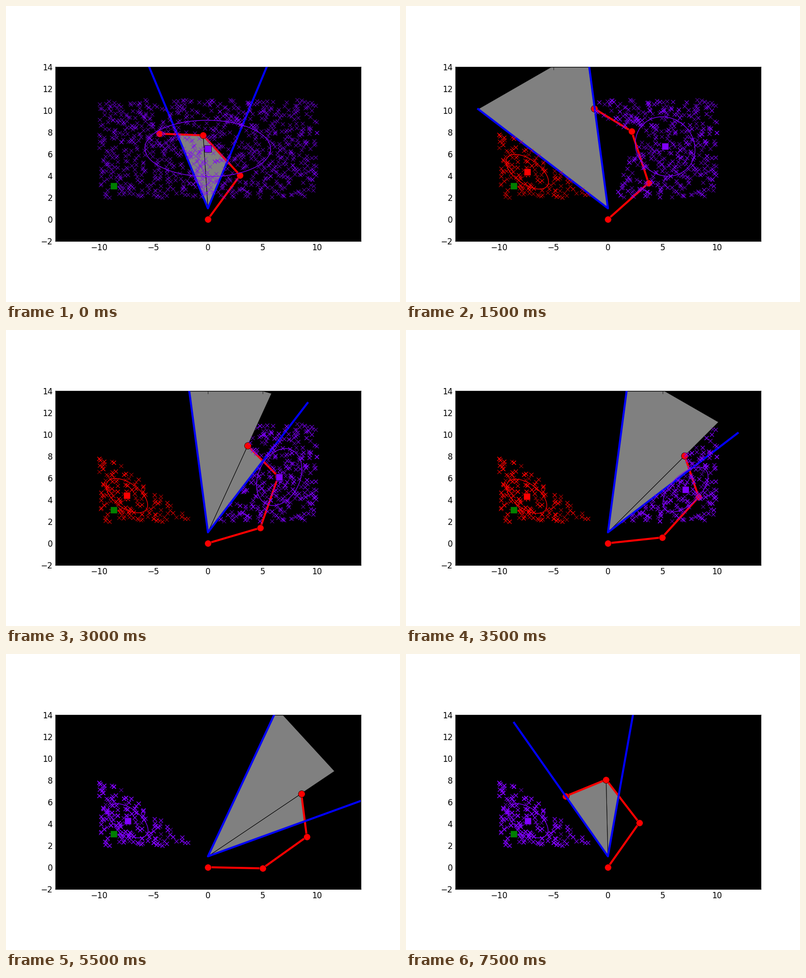
These frames come from a looping animation (812x612 px, 8 s). A matplotlib script:

```python
import numpy as np
import matplotlib.pyplot as plt
from matplotlib.animation import FuncAnimation
from matplotlib.collections import PolyCollection
from matplotlib.path import Path

plt.rcParams.update({"font.family": "DejaVu Sans", "font.size": 12,
                     "axes.linewidth": 1.0})

EYE = np.array([0.0, 1.0])
REACH, HALF_FOV = 15.0, 22.5
LINKS = (5, 5, 4)
COLORS = ((0.5, 0, 1), (1, 0, 0))
COUNT = 1000

GAZE = (90, 90, 105, 120, 105, 90, 75, 60, 45, 30,
        27.5, 42.5, 57.5, 72.5, 87.5, 102.5)
# Absolute heading of each arm link, in degrees
ARM = ((53.9, 132.6, 177.9), (43, 105, 170), (42, 106, 160),
       (41.8, 108.1, 148.7), (34.2, 100.7, 154.4), (26.6, 93.4, 160.2),
       (16.4, 70.7, 134.4), (6.1, 48, 108.6), (-4.5, 34.3, 94.3),
       (-10, 20.6, 79.9), (-12.2, 17, 76), (-1.2, 35.6, 97.2),
       (10, 54, 117), (24, 78, 145), (40, 104, 175), (54.9, 127.5, 202.3))


def unit(deg):
    a = np.radians(deg)
    return np.array([np.cos(a), np.sin(a)])


def bearing(p):
    d = np.asarray(p) - EYE
    return np.degrees(np.arctan2(d[..., 1], d[..., 0]))


def arm_joints(headings):
    steps = [n * unit(h) for n, h in zip(LINKS, headings)]
    return np.vstack([[0, 0], np.cumsum(steps, axis=0)])


def cast(deg, seg):
    """Distance along the ray and position along the segment."""
    p, q = seg
    m = np.column_stack([unit(deg), p - q])
    if abs(np.linalg.det(m)) < 1e-9:
        return np.inf, np.inf
    return np.linalg.solve(m, p - EYE)


def visible(gaze, joints):
    """Triangles the eye can see, with the arm blocking the view."""
    lo, hi = gaze - HALF_FOV, gaze + HALF_FOV
    chord = (EYE + REACH * unit(lo), EYE + REACH * unit(hi))
    links = list(zip(joints[:-1], joints[1:]))
    cuts = [lo] + sorted(b for b in bearing(joints) if lo < b < hi) + [hi]
    tris = []
    for a, b in zip(cuts[:-1], cuts[1:]):
        mid = (a + b) / 2
        best, wall = cast(mid, chord)[0], chord
        for link in links:
            t, s = cast(mid, link)
            if 0 < t < best and 0 <= s <= 1:
                best, wall = t, link
        tris.append([EYE] + [EYE + cast(g, wall)[0] * unit(g) for g in (a, b)])
    return np.array(tris)


def scatter_particles(rng):
    def spread(lo, hi):
        return lo + (hi - lo) * (rng.permutation(COUNT) + rng.random(COUNT)) / COUNT
    x, y = spread(-10, 10), spread(2, 11)
    low = (x > 0) & (bearing(np.column_stack([x, y])) < 8.5)
    corner = (x > 9.8) & (y < 3.4)
    pts = np.column_stack([x, y])[~(low | corner)]
    return np.vstack([pts, [8.85, 2.15]])


def resample(pts, tris, rng):
    """Drop seen particles and refill with copies of the rest."""
    seen = np.zeros(len(pts), bool)
    for tri in tris:
        seen |= Path(tri).contains_points(pts)
    rest = pts[~seen]
    return np.vstack([rest, rest[rng.integers(len(rest), size=seen.sum())]])


def clusters(k, pts):
    if k == 0:
        return [pts]
    left = bearing(pts) > 107
    groups = [pts[~left], pts[left]]
    if k >= 8:
        groups.reverse()
    return [g for g in groups if len(g)]


def spread_ellipse(pts):
    mean = pts.mean(axis=0)
    d = pts - mean
    w, v = np.linalg.eigh(d.T @ d / len(pts))
    t = np.linspace(0, 2 * np.pi, 121)
    ring = np.array([np.cos(t), np.sin(t)])
    return mean, mean[:, None] + v @ (np.sqrt(np.clip(w, 0, None))[:, None] * ring)


def simulate():
    rng = np.random.default_rng(7)
    pts = scatter_particles(rng)
    out = []
    for k, (gaze, headings) in enumerate(zip(GAZE, ARM)):
        joints = arm_joints(headings)
        tris = visible(gaze, joints)
        if k:
            pts = resample(pts, tris, rng)
        out.append((gaze, joints, tris, clusters(k, pts)))
    return out


STATES = simulate()

# The small excess keeps the pixel size from rounding down
fig = plt.figure(figsize=(8.12001, 6.12001), dpi=100, facecolor="white")
ax = fig.add_axes([0.125, 0.1, 0.775, 0.8], facecolor="black")
ax.set(xlim=(-14, 14), ylim=(-2, 14), aspect="equal",
       xticks=range(-10, 11, 5), yticks=range(-2, 15, 2))
ax.set_axisbelow(False)
ax.tick_params(direction="in", top=True, right=True, length=4, width=0.5, pad=4)

sight = PolyCollection([], facecolor="gray", edgecolor="black",
                       linewidth=0.7, zorder=1)
ax.add_collection(sight, autolim=False)
edge = dict(markeredgecolor="black", markeredgewidth=0.5)
arm, = ax.plot([], [], "o-", color="red", lw=3, ms=10, zorder=2, **edge)
view, = ax.plot([], [], color="blue", lw=3, zorder=3)
layers = []
for c in COLORS:
    cross, = ax.plot([], [], "x", color=c, ms=6, mew=0.5, zorder=4)
    ring, = ax.plot([], [], color=c, lw=1, zorder=4)
    center, = ax.plot([], [], "s", color=c, ms=10, zorder=5, **edge)
    layers.append((cross, ring, center))
ax.plot([-8.65], [3.05], "s", color="green", ms=9.5, zorder=6, **edge)


def draw(k):
    gaze, joints, tris, groups = STATES[k]
    sight.set_verts(tris)
    arm.set_data(*joints.T)
    ends = [EYE + REACH * unit(gaze + s * HALF_FOV) for s in (1, -1)]
    view.set_data(*np.array([ends[0], EYE, ends[1]]).T)
    for i, (cross, ring, center) in enumerate(layers):
        shown = i < len(groups)
        for artist in (cross, ring, center):
            artist.set_visible(shown)
        if shown:
            mean, curve = spread_ellipse(groups[i])
            cross.set_data(*groups[i].T)
            ring.set_data(*curve)
            center.set_data(mean[:1], mean[1:])
    return []


anim = FuncAnimation(fig, draw, frames=len(STATES), interval=500,
                     repeat=True, repeat_delay=0, blit=False)
plt.show()
```
